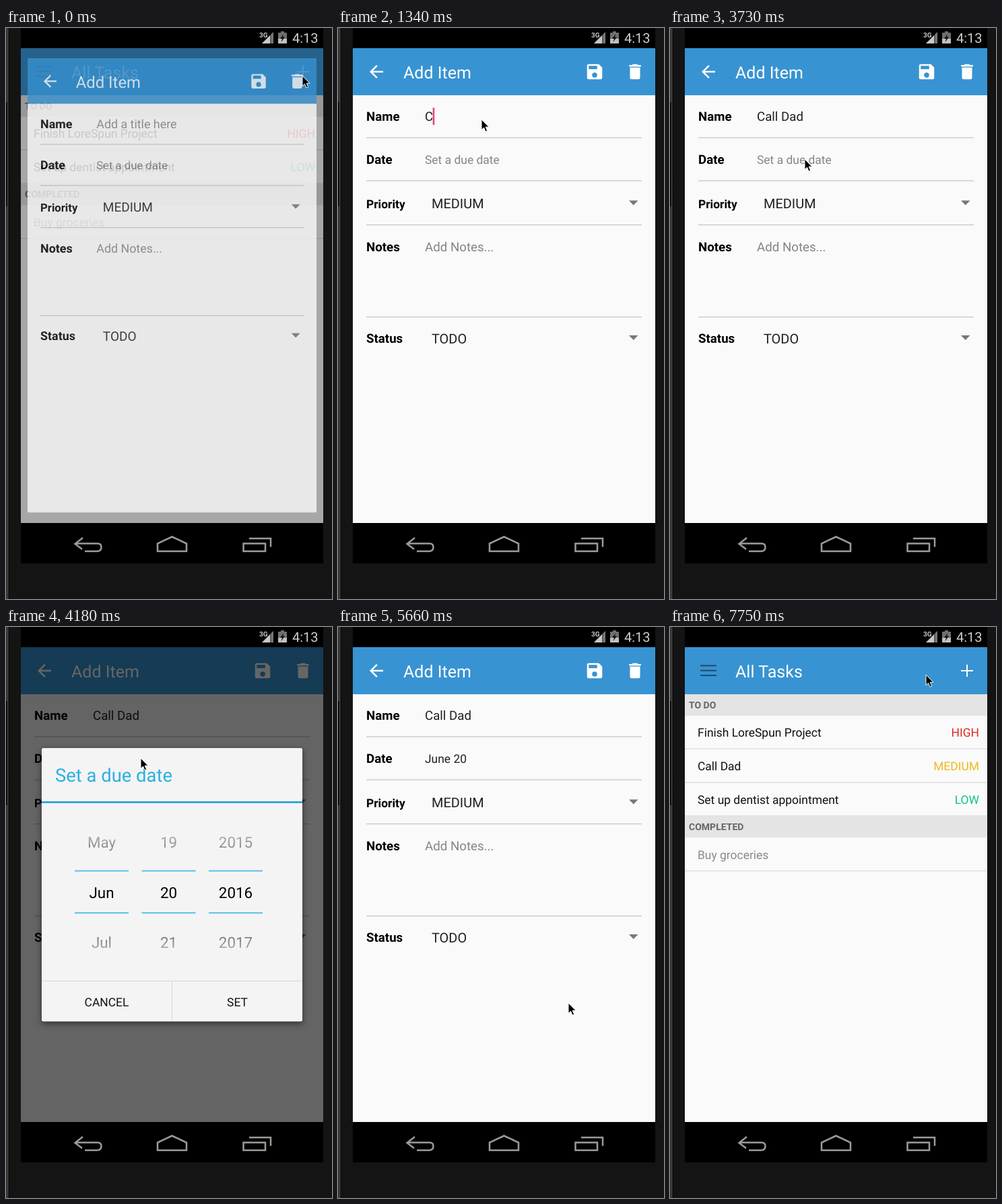
Write an HTML page that moves like this. It is 484 by 849 pixels and loops after 8000 ms.

```html
<!DOCTYPE html>
<html lang="en">
<head>
<meta charset="utf-8">
<title>Task list</title>
<style>
html, body { margin: 0; width: 100%; height: 100%; overflow: hidden; background: #141414; }
svg { display: block; width: 484px; height: 849px; }
text { font-family: Roboto, sans-serif; white-space: pre; text-rendering: geometricPrecision; }
#add, #dialog { transform-origin: 246.5px 383px; }
#card { filter: drop-shadow(0 3px 5px rgba(0, 0, 0, .55)); }
</style>
</head>
<body>
<svg id="stage" viewBox="0 0 484 849"></svg>
<script>
const LOOP = 8000, TICK = 149;
const BLUE = '#3893d2', PAPER = '#fafafa', HINT = '#858585', INK = '#202020';
const SMALL = 17.46, BODY = 18.7, LARGE = 19.95;

const rect = (x, y, w, h, fill, more = '') =>
  `<rect x="${x}" y="${y}" width="${w}" height="${h}" fill="${fill}" ${more}/>`;
const text = (x, y, size, fill, str, more = '') =>
  `<text x="${x}" y="${y}" font-size="${size}" fill="${fill}" ${more}>${str}</text>`;
const path = (d, fill, more = '') => `<path d="${d}" fill="${fill}" ${more}/>`;
const line = (d, color, width) => path(d, 'none', `stroke="${color}" stroke-width="${width}"`);
const icon = (x, y, d) => path(d, '#fff', `transform="translate(${x} ${y}) scale(1.25)"`);
const BOLD = 'font-weight="700"', END = 'text-anchor="end"', MID = 'text-anchor="middle"';

const page = title =>
  rect(22, 30, 449, 706, PAPER) + rect(22, 30, 449, 70, BLUE) + text(97, 75, 25, '#fff', title);

function device() {
  return rect(0, 0, 484, 849, '#141414') + rect(0, 0, 6, 849, 'url(#edge)') +
    rect(0, 110, 1.5, 155, '#000') + rect(22, 0, 449, 796, '#000') +
    text(376, 14, 10, '#c8c8c8', '3G', BOLD) +
    path('M397 6V23H380Z', '#555') + path('M392 11V23H380Z', '#c8c8c8') +
    path('M397 6V23H393.5V9.5Z', '#777') +
    path('M408 5H413V7H417V23H404V7H408Z', '#707070') +
    path('M404 16H417V23H404Z', '#c0c0c0') + path('M412 9L407 16H410L408.5 21L414 13.5H411Z', '#111') +
    text(425, 22, 20, '#cdcdcd', '4:13') +
    line('M114 758L102.500 767L113 775M104 766.500H136Q141.500 766.500 141.500 772T136 778H117', '#9a9d98', 2.5) +
    line('M225 778V766.500L246.500 756.500L268 766.500V778Z', '#9a9d98', 2.5) +
    line('M352.500 766.500H385V778H352.500ZM361 759H393V771.500', '#9a9d98', 2.5);
}

function listPage() {
  const section = (y, label) => rect(22, y, 449, 32, '#e4e4e4') + text(28, y + 21, 14, '#666', label, BOLD);
  const row = (y, label, level = '', color = '', ink = '#111') =>
    text(41, y + 31, SMALL, ink, label) + text(459, y + 31, SMALL, color, level, END) +
    rect(22, y + 48.5, 449, 1.3, '#dcdcdc');
  return page('All Tasks') +
    line('M45 57.500H69M45 64.800H69M45 72H69', '#1f4b6c', 2) +
    line('M441 56V74M432 65H450', '#fff', 2) +
    section(100, 'TO DO') + row(132, 'Finish LoreSpun Project', 'HIGH', '#dc2a1e') +
    `<g id="fresh">${row(182, 'Call Dad', 'MEDIUM', '#efb91c')}</g>` +
    `<g id="rest">${row(231.7, 'Set up dentist appointment', 'LOW', '#0bc48c') +
      section(281, 'COMPLETED') + row(313.5, 'Buy groceries', '', '', '#8a8a8a')}</g>`;
}

function addPage() {
  const label = (y, str, size = BODY) => text(42, y, size, '#000', str, BOLD);
  const rule = y => rect(42, y, 409, 1.4, '#cbcbcb');
  const arrow = y => path(`M432 ${y}H445.500L438.700 ${y + 7}Z`, '#777');
  return page('Add Item') +
    icon(42, 50, 'M20 11H7.830l5.590-5.590L12 4l-8 8 8 8 1.410-1.410L7.830 13H20z') +
    icon(366, 50, 'M17 3H5a2 2 0 0 0-2 2v14a2 2 0 0 0 2 2h14a2 2 0 0 0 2-2V7zM12 19a3 3 0 1 1 0-6 3 3 0 0 1 0 6zM15 9H5V5h10z') +
    icon(426, 50, 'M6 19a2 2 0 0 0 2 2h8a2 2 0 0 0 2-2V7H6zM19 4h-3.500l-1-1h-5l-1 1H5v2h14z') +
    label(138, 'Name') + text(129, 138, BODY, HINT, '', 'id="name"') +
    rect(0, 118.5, 2.6, 25.5, '#e5457f', 'id="caret"') + rule(162.5) +
    label(202, 'Date') + text(129, 202, SMALL, HINT, '', 'id="date"') + rule(226.5) +
    label(268, 'Priority', SMALL) + text(139, 268, LARGE, INK, 'MEDIUM') + arrow(256.5) + rule(292) +
    label(332, 'Notes') + text(129, 332, BODY, HINT, 'Add Notes...') + rule(429) +
    label(468, 'Status') + text(139, 468.5, LARGE, INK, 'TODO') + arrow(457);
}

function dialog() {
  const wheel = (x, words) =>
    words.map((w, i) => text(x, 328 + i * 74.5, 22.4, ['url(#up)', '#000', 'url(#down)'][i], w, MID)).join('') +
    rect(x - 40, 361.5, 80, 2.2, '#66c5e8') + rect(x - 40, 424, 80, 2.2, '#66c5e8');
  return rect(53, 180, 387, 406.5, '#f4f4f4', 'rx="2.5" id="card"') +
    text(73, 230, 27.4, '#2bb0e0', 'Set a due date') + rect(53, 259, 387, 3, '#39a9d9') +
    rect(247, 527, 193, 59.5, '#e2e2e2', 'id="pressed"') +
    wheel(142, ['May', 'Jun', 'Jul']) + wheel(241.5, ['19', '20', '21']) + wheel(341, ['2015', '2016', '2017']) +
    rect(53, 526, 387, 1, '#d6d6d6') + rect(246, 526, 1, 60.5, '#d6d6d6') +
    text(149.5, 564, SMALL, '#111', 'CANCEL', MID) + text(343.5, 564, SMALL, '#111', 'SET', MID);
}

const fade = (id, stops, dir) => `<linearGradient id="${id}" x1="0" y1="0" ${dir}="1" ${dir === 'y2' ? 'x2="0"' : 'y2="0"'}>` +
  stops.map((c, i) => `<stop offset="${i / (stops.length - 1)}" stop-color="${c}"/>`).join('') + '</linearGradient>';

const $ = id => document.getElementById(id);
$('stage').innerHTML = '<defs>' +
  fade('edge', ['#2c2c2c', '#3d3d3d', '#3a3a3a', '#0c0c0c', '#141414'], 'x2') +
  fade('up', ['#b4b4b4', '#808080'], 'y2') + fade('down', ['#707070', '#b4b4b4'], 'y2') + '</defs>' +
  device() + listPage() + rect(22, 30, 449, 706, '#000', 'id="listShade"') +
  `<g id="add">${addPage()}</g>` + rect(22, 30, 449, 706, '#000', 'id="shade"') +
  `<g id="dialog">${dialog()}</g>` +
  path('M0 0V15.500L3.500 12.200L6 18L8.700 16.900L6.200 11.200H11Z', '#000', 'id="mouse" stroke="#fff" stroke-width="1"');

// Tick, x, y of the pointer
const MOUSE = [[0, 440, 71], [1, 389, 85], [2, 322, 110], [3, 262, 127], [5, 213, 136], [17, 213, 136],
  [20, 200, 179], [22, 200, 179], [25, 200, 195], [29, 200, 195], [31, 262, 372], [33, 342, 559],
  [38, 342, 559], [41, 412, 330], [45, 386, 90], [46, 383, 75], [47, 382, 73], [52, 380, 71]];
// Tick, scale, opacity, shade
const ADD = [[0, .9555, .79, .335], [1, 1, 1, 0], [50, .986, .85, 0], [51, .86, .12, 0], [52, .8, 0, 0]];
const DIALOG = [[0, 1, 0, 0], [27, .95, .5, .35], [28, 1, 1, .6], [35, .943, .48, .5], [36, .9, .06, .15], [37, 1, 0, 0]];

const at = (table, tick) => table.filter(r => r[0] <= tick).pop();

function glide(table, tick) {
  const a = at(table, tick), b = table.find(r => r[0] > tick) || a;
  const p = b === a ? 0 : (tick - a[0]) / (b[0] - a[0]);
  return [a[1] + (b[1] - a[1]) * p, a[2] + (b[2] - a[2]) * p];
}

function pose(id, shadeId, [, scale, opacity, dark]) {
  $(id).style.transform = `scale(${scale})`;
  $(id).style.opacity = opacity;
  $(shadeId).style.opacity = dark;
}

function field(id, value, hint) {
  $(id).textContent = value || hint;
  $(id).setAttribute('fill', value ? INK : HINT);
}

const show = (id, on) => $(id).setAttribute('visibility', on ? 'visible' : 'hidden');

function draw(tick) {
  const typed = tick < 9 ? 0 : tick < 15 ? tick - 8 : tick < 16 ? 6 : tick < 17 ? 7 : 8;
  field('name', 'Call Dad'.slice(0, typed), 'Add a title here');
  $('caret').setAttribute('x', 129 + (typed ? $('name').getComputedTextLength() - .5 : 0));
  show('caret', tick >= 5 && tick < 23);
  field('date', tick >= 38 ? 'June 20' : '', 'Set a due date');

  const saved = tick >= 50;
  show('fresh', saved);
  $('rest').setAttribute('transform', `translate(0 ${saved ? 0 : -49.8})`);
  show('pressed', tick >= 34);
  pose('add', 'listShade', at(ADD, tick));
  pose('dialog', 'shade', at(DIALOG, tick));
  $('mouse').setAttribute('transform', `translate(${glide(MOUSE, tick)})`);
}

const start = performance.now();
let last = -1;
function frame() {
  const t = (performance.now() - start) % LOOP;
  const tick = Math.floor((t + 6) / TICK);
  if (tick !== last) draw(last = tick);
  requestAnimationFrame(frame);
}
frame();
</script>
</body>
</html>
```
